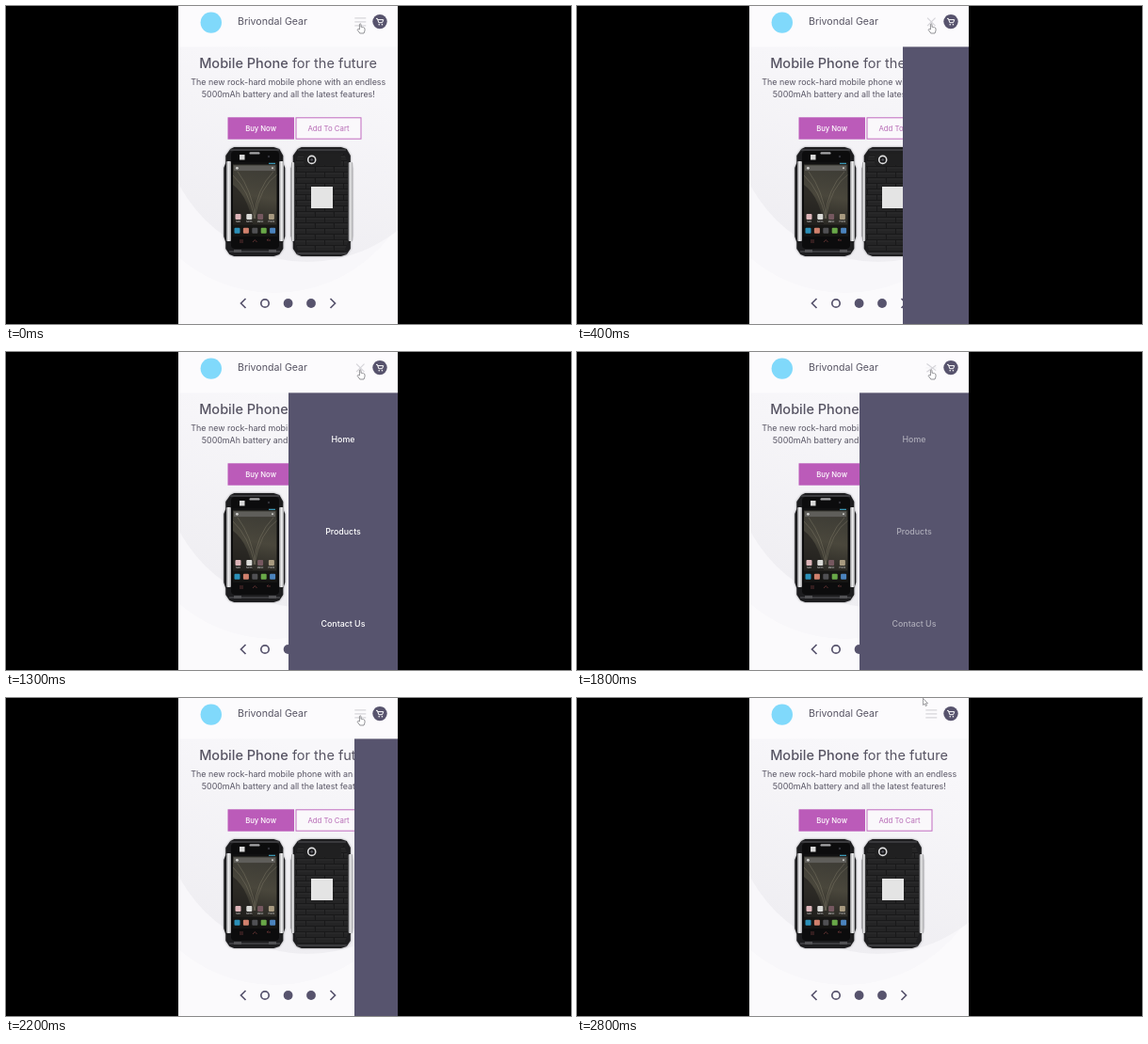
Recreate the animation shown at these times as an HTML page. Size 600 by 338 pixels, loop 3000 ms.

```html
<!DOCTYPE html>
<html lang="en">
<head>
<meta charset="utf-8">
<title>Mobile shop menu</title>
<style>
  html, body { margin: 0; width: 100%; height: 100%; overflow: hidden; background: #000; }
  svg { display: block; width: 600px; height: 338px; }
  text { font-family: Inter, "Open Sans", sans-serif; fill: #575463; }
  .mid { text-anchor: middle; }
  .line { fill: none; stroke: #57536d; stroke-width: 1.7; }
  .links text { fill: #fff; font-size: 8.8px; font-weight: 500; text-anchor: middle; }
  .bars line { stroke: #d5d4d9; stroke-width: 1.2; }
</style>
</head>
<body>
<svg viewBox="0 0 600 338">
  <defs>
    <clipPath id="page"><rect x="183" width="233" height="338"/></clipPath>
    <clipPath id="screen"><rect x="241" y="166" width="46.5" height="79"/></clipPath>
    <linearGradient id="disc" x1=".6" y1="0" x2=".3" y2="1">
      <stop offset=".3" stop-color="#f8f7fa"/><stop offset="1" stop-color="#eeedf1"/>
    </linearGradient>
    <linearGradient id="wall" x1=".5" y1="0" x2=".4" y2="1">
      <stop offset="0" stop-color="#3b3a34"/><stop offset=".45" stop-color="#4a473c"/><stop offset="1" stop-color="#1d1c1a"/>
    </linearGradient>
    <linearGradient id="steel">
      <stop offset="0" stop-color="#8b8b8e"/><stop offset=".5" stop-color="#ececed"/><stop offset="1" stop-color="#a0a0a3"/>
    </linearGradient>
    <pattern id="ribs" x="308" y="170" width="20" height="12" patternUnits="userSpaceOnUse">
      <rect width="20" height="12" fill="#242425"/>
      <path d="M0 .5H20M0 6.5H20M.5 0V6M10.5 6V12" stroke="#19191a" fill="none"/>
      <path d="M1 2H19M0 8H10M11 8H20" stroke="#2b2b2c" fill="none"/>
    </pattern>
    <filter id="soft" x="-10%" y="-10%" width="120%" height="120%"><feGaussianBlur stdDeviation="1.2"/></filter>
    <path id="shell" d="M7 2 11 0H53L59 2 63 9V17L65 22V95L63 101V108L59 114 53 116H11L6 114 2 108V101L0 95V22L2 17V9Z"/>
  </defs>

  <g clip-path="url(#page)">
    <rect x="183" width="233" height="338" fill="#fbfafc"/>
    <circle cx="285" cy="150" r="155" fill="#f8f7fa"/>
    <circle cx="320" cy="118" r="154" fill="url(#disc)"/>
    <rect x="183" width="233" height="43.5" fill="#fcfbfd"/>

    <circle cx="217.8" cy="17.6" r="11.2" fill="#80d9fb"/>
    <text x="246" y="20.2" font-size="10.6">Brivondal Gear</text>

    <g class="mid">
      <text x="299.5" y="66.2" font-size="14.5"><tspan font-weight="500">Mobile Phone</tspan> for the future</text>
      <text x="299.8" y="83.7" font-size="8.9">The new rock-hard mobile phone with an endless</text>
      <text x="299.8" y="96.5" font-size="8.9">5000mAh battery and all the latest features!</text>
      <rect x="235.5" y="118.3" width="70.5" height="23.4" fill="#bb5bb9"/>
      <text x="270.6" y="132.8" font-size="7.7" font-weight="500" style="fill:#fff">Buy Now</text>
      <rect x="308" y="118.8" width="69" height="22.4" fill="#faf8fb" stroke="#c16bbf"/>
      <text x="342.5" y="132.8" font-size="7.8" style="fill:#b76bb6">Add To Cart</text>
    </g>

    <g id="front">
      <use href="#shell" x="231.3" y="150" fill="#88888c" filter="url(#soft)"/>
      <use href="#shell" x="231.3" y="150" fill="#1d1d1f"/>
      <path d="M238 153H290M237 261H291" stroke="#454548" stroke-width="1.5"/>
      <rect x="234" y="165" width="5" height="85" rx="1" fill="url(#steel)"/>
      <rect x="290" y="165" width="5" height="85" rx="1" fill="url(#steel)"/>
      <rect x="239" y="154" width="51" height="104" rx="4" fill="#0c0c0d"/>
      <rect x="258.5" y="155.2" width="11" height="2.4" rx="1.2" fill="#a5a5a8"/>
      <circle cx="279" cy="160" r="1.2" fill="#34343a"/>
      <rect x="248" y="158" width="5.5" height="5.5" fill="#d8d8d8"/>
      <g clip-path="url(#screen)">
        <rect x="241" y="166" width="48" height="79" fill="url(#wall)"/>
        <g fill="none" stroke="#8f8b76" stroke-width=".7" opacity=".5">
          <path d="M241 180Q258 196 264 226M246 176Q261 196 265 226M289 178Q269 192 264 226M284 176Q266 194 263 226"/>
        </g>
        <path d="M241 190Q257 202 262 232H241Z" fill="#1d1c19" opacity=".6"/>
        <rect x="241" y="166" width="48" height="2.5" fill="#111"/>
        <path d="M279 167.3H286" stroke="#45b8dc" stroke-width="1"/>
        <rect x="242" y="169.5" width="44" height="5.6" fill="#5f5e5a"/>
        <circle cx="245.4" cy="172.3" r="1.4" fill="#d2d2cf"/>
        <circle cx="283" cy="172.3" r="1" fill="#d2d2cf"/>
        <rect x="241" y="232.5" width="48" height="13" fill="#121211" opacity=".75"/>
        <g id="apps"></g>
      </g>
      <path d="M248 249H252M248 251H252M262 251 264.3 248.5 266.5 251M281 249H277L278.5 247.5" fill="none" stroke="#6d3838" stroke-width=".8"/>
      <path d="M242 260.5H250M279 260.5H287" stroke="#525255" stroke-width="3"/>
    </g>

    <g id="back">
      <use href="#shell" x="302.8" y="150" fill="#88888c" filter="url(#soft)"/>
      <use href="#shell" x="302.8" y="150" fill="#1e1e20"/>
      <path d="M310 153H361M309 263H362" stroke="#434345" stroke-width="1.5"/>
      <rect x="303" y="166" width="3.2" height="84" rx="1" fill="url(#steel)"/>
      <rect x="363.6" y="166" width="4.6" height="84" rx="1" fill="url(#steel)"/>
      <path d="M311 157H359L363 167V251L359 261H311L307 251V167Z" fill="url(#ribs)"/>
      <rect x="316" y="156.5" width="40" height="13" rx="4" fill="#202021"/>
      <circle cx="324.7" cy="163.4" r="4" fill="#151517" stroke="#dededf" stroke-width="1.6"/>
      <circle cx="324.7" cy="163.4" r="1.4" fill="#55555d"/>
      <rect x="324" y="192" width="23" height="23" fill="#e4e4e4"/>
    </g>

    <path class="line" d="M254.5 311 249.5 316 254.5 321M344.5 311 349.5 316 344.5 321"/>
    <circle class="line" cx="275" cy="316" r="4.2"/>
    <circle cx="299.6" cy="316" r="4.9" fill="#57536d"/>
    <circle cx="324" cy="316" r="4.9" fill="#57536d"/>

    <rect id="panel" y="43.4" width="118" height="295" fill="#57546e"/>
    <g class="links" id="links">
      <text x="358" y="96.2">Home</text>
      <text x="358" y="194.2">Products</text>
      <text x="358" y="292.2">Contact Us</text>
    </g>

    <g class="bars" id="bars">
      <line x1="-6" x2="6"/><line x1="-6" x2="6"/><line x1="-6" x2="6"/>
    </g>
    <circle cx="397" cy="16.6" r="7.7" fill="#57536d"/>
    <path d="M393 13.4H394.4L395.8 17.7H399.6L400.7 14.6H394.8" fill="none" stroke="#fff" stroke-width="1"/>
    <circle cx="396.2" cy="19.8" r=".8" fill="#fff"/><circle cx="399.4" cy="19.8" r=".8" fill="#fff"/>

    <path id="hand" d="M375.4 25V19.4Q376.2 18.2 377 19.4V22.4Q378 21.7 378.6 22.7 379.6 22.2 380 23.2 381 23 381 24.2V26.2L380 29H375.8L373.2 25.4Q373.5 24.2 374.5 24.6Z" fill="#fff" stroke="#77777b" stroke-width=".8"/>
    <path id="arrow" d="M0 0V7.2L1.7 5.8 2.8 8.3 4 7.7 2.9 5.4H5Z" fill="#fff" stroke="#77777b" stroke-width=".7"/>
  </g>
</svg>
<script>
const $ = id => document.getElementById(id);
const LOOP = 3000, STEP = 100, EDGE = 416, WIDTH = 116.4;
const ramp = (t, from, to) => Math.min(1, Math.max(0, (t - from) / (to - from)));
const links = [...$('links').children];
const bars = [...$('bars').children];

function addApps(colors, x, gap, y, size, labels) {
  colors.forEach((fill, i) => {
    const cx = x + i * gap;
    $('apps').insertAdjacentHTML('beforeend',
      `<rect x="${cx - size / 2}" y="${y - size / 2}" width="${size}" height="${size}" rx="1" fill="${fill}"/>` +
      (labels ? `<text class="mid" x="${cx}" y="${y + 6}" font-size="2.4" style="fill:#ddd">${labels[i]}</text>` : ''));
  });
}
addApps(['#dcb4b8', '#d9d9d6', '#75585f', '#a89a80'], 246.5, 11.8, 224, 6, ['Mail', 'Notes', 'Music', 'Photo']);
addApps(['#2b8fb8', '#d0806c', '#505053', '#68a848', '#4b83bd'], 245.5, 9.4, 238.8, 6);

function drawBars(cross) {
  bars.forEach((bar, i) => {
    const side = i - 1;
    const y = 16.9 + side * 4 * (1 - cross);
    bar.setAttribute('transform', `translate(376.3 ${y}) rotate(${-side * 45 * cross})`);
    bar.setAttribute('opacity', side ? 1 : 1 - cross);
  });
}

function draw(t) {
  const open = ramp(t, 130, 580) - ramp(t, 1928, 2378);
  $('panel').setAttribute('x', Math.round(EDGE - WIDTH * open));

  const fade = 1 - ramp(t, 1700, 1900);
  links.forEach((link, i) => {
    const p = ramp(t, 480 + i * 200, 880 + i * 200);
    link.setAttribute('transform', `translate(${20 * (1 - p)} 0)`);
    link.setAttribute('opacity', p * fade);
  });

  drawBars(ramp(t, 50, 350) - ramp(t, 1750, 2000));

  const leaving = t >= 2700;
  $('hand').setAttribute('visibility', leaving ? 'hidden' : 'visible');
  $('arrow').setAttribute('visibility', leaving ? 'visible' : 'hidden');
  $('arrow').setAttribute('transform', t < 2800 ? 'translate(371 9)' : 'translate(367.5 .3)');
}

const start = performance.now();
function tick() {
  const t = (performance.now() - start) % LOOP;
  draw(Math.floor(t / STEP) * STEP);
  requestAnimationFrame(tick);
}
tick();
</script>
</body>
</html>
```
